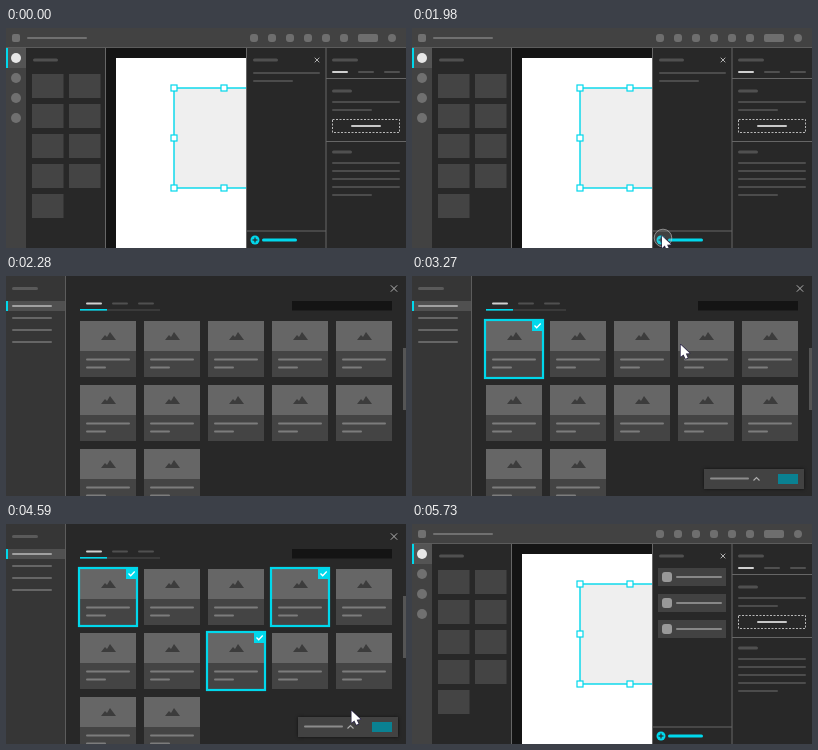
These frames come from a looping animation (400x220 px, 8100 ms). An HTML page with a canvas:

```html
<!DOCTYPE html>
<html lang="en">
<head>
<meta charset="utf-8">
<title>Adding items from a library</title>
<style>
html, body { margin: 0; width: 100%; height: 100%; overflow: hidden; background: #282828; }
canvas { display: block; width: 400px; height: 220px; }
</style>
</head>
<body>
<canvas id="stage"></canvas>
<script>
const W = 400, H = 220, LOOP = 8100, STEP = 30;
const CYAN = '#00d8ec', PANEL = '#282828', BAR = '#424242', EDGE = '#666', DIM = '#4c4c4c';
const scale = window.devicePixelRatio || 1;

function setup(canvas) {
  canvas.width = W * scale;
  canvas.height = H * scale;
  const ctx = canvas.getContext('2d');
  ctx.scale(scale, scale);
  return ctx;
}

const screen = setup(document.getElementById('stage'));
const layer = document.createElement('canvas');
const overlay = setup(layer);
let c = screen;

// Drawing helpers
function box(x, y, w, h, color, radius = 0) {
  c.fillStyle = color;
  c.beginPath();
  c.roundRect(x, y, w, h, radius);
  c.fill();
}
function frame(x, y, w, h, color, width) {
  c.strokeStyle = color;
  c.lineWidth = width;
  c.strokeRect(x, y, w, h);
}
function disc(x, y, r, color) {
  c.fillStyle = color;
  c.beginPath();
  c.arc(x, y, r, 0, Math.PI * 2);
  c.fill();
}
function bar(x1, x2, y, color, h = 2) {
  box(x1, y - h / 2, x2 - x1, h, color, h / 2);
}
function path(points, color, width) {
  c.strokeStyle = color;
  c.lineWidth = width;
  c.beginPath();
  points.forEach(([x, y]) => c.lineTo(x, y));
  c.stroke();
}
function cross(x, y, r) {
  path([[x - r, y - r], [x + r, y + r]], '#b0b0b0', 1);
  path([[x - r, y + r], [x + r, y - r]], '#b0b0b0', 1);
}

function drawTopBar() {
  box(0, 0, W, 20, BAR);
  box(0, 19, W, 1, '#5c5c5c');
  box(6, 6, 8, 8, '#707070', 2);
  bar(21, 81, 10, '#707070');
  for (let x = 248; x <= 338; x += 18) box(x - 4, 6, 8, 8, '#6e6e6e', 3);
  box(352, 6, 20, 8, '#6e6e6e', 2);
  disc(386, 10, 4, '#6e6e6e');
}

function drawLeftPanels() {
  box(0, 20, 20, 200, BAR);
  box(0, 20, 20, 20, '#545454');
  box(0, 20, 2, 20, CYAN);
  for (let i = 0; i < 4; i++) disc(10, 30 + i * 20, 5, i ? '#707070' : '#e8e8e8');
  box(20, 20, 80, 200, PANEL);
  bar(27, 52, 32, '#505050', 3);
  for (let i = 0; i < 9; i++) {
    box(26 + (i % 2) * 37, 46 + Math.floor(i / 2) * 30, 31.5, 24, '#444');
  }
  box(99, 20, 1, 200, EDGE);
}

function drawPage() {
  box(100, 20, 140, 200, '#141414');
  box(110, 30, 130, 190, '#fff');
  box(168, 60, 72, 100, '#efefef');
  frame(168, 60, 100, 100, CYAN, 1.4);
  for (const [x, y] of [[168, 60], [218, 60], [168, 110], [168, 160], [218, 160]]) {
    box(x - 3, y - 3, 6, 6, '#fff');
    frame(x - 3, y - 3, 6, 6, CYAN, 1.2);
  }
}

function drawItemPanel(filled) {
  box(240, 20, 80, 200, PANEL);
  bar(247, 272, 32, '#505050', 3);
  cross(311, 32, 2.3);
  if (filled) {
    for (const y of [44, 70, 96]) {
      box(246, y, 68, 18, BAR);
      box(250, y + 4, 10, 10, '#999', 3);
      bar(264, 310, y + 9, '#888');
    }
  } else {
    bar(247, 314, 45, DIM);
    bar(247, 287, 53, DIM);
  }
  box(240, 20, 1, 200, EDGE);
  box(240, 202.5, 80, 1, EDGE);
  disc(249, 212, 4.5, CYAN);
  path([[246.5, 212], [251.5, 212]], PANEL, 1.2);
  path([[249, 209.5], [249, 214.5]], PANEL, 1.2);
  bar(256, 291, 212, CYAN, 3);
}

function drawProperties() {
  box(320, 20, 80, 200, PANEL);
  box(319.5, 20, 1, 200, EDGE);
  bar(326, 352, 32, '#505050', 3);
  for (let i = 0; i < 3; i++) bar(326 + i * 26, 342 + i * 26, 44, i ? '#505050' : '#d0d0d0');
  box(320, 50, 80, 1, EDGE);
  bar(326, 346, 63, '#505050', 3);
  bar(326, 394, 74, DIM);
  bar(326, 366, 82, DIM);
  c.setLineDash([2, 1.5]);
  frame(326.5, 91.5, 67, 13, '#b8b8b8', 1);
  c.setLineDash([]);
  bar(345, 375, 98, '#c8c8c8');
  box(320, 113, 80, 1, EDGE);
  bar(326, 346, 124, '#505050', 3);
  for (let y = 135; y <= 167; y += 8) bar(326, y < 167 ? 394 : 366, y, DIM);
}

function drawEditor(filled) {
  drawLeftPanels();
  drawPage();
  drawItemPanel(filled);
  drawProperties();
  drawTopBar();
}

function drawCard(x, y, picked) {
  box(x, y, 56, 30, '#666');
  box(x, y + 30, 56, 26, '#444');
  c.fillStyle = '#3c3c3c';
  c.beginPath();
  for (const [px, py] of [[21, 19], [25, 14], [27, 16], [30, 11], [36, 19]]) c.lineTo(x + px, y + py);
  c.fill();
  bar(x + 6, x + 50, y + 38.5, '#7c7c7c');
  bar(x + 6, x + 26, y + 46.5, '#7c7c7c');
  if (!picked) return;
  frame(x - 1, y - 1, 58, 58, CYAN, 2.2);
  box(x + 46, y - 1, 11, 11, CYAN);
  path([[x + 48.5, y + 4.5], [x + 50.7, y + 6.8], [x + 54.7, y + 2.5]], '#fff', 1.3);
}

// Card index and the moment it gets picked
const picks = { 0: 2880, 3: 3480, 7: 4080 };

function drawLibrary(t) {
  box(0, 0, W, H, PANEL);
  box(0, 0, 60, H, '#363636');
  box(59, 0, 1, H, '#5c5c5c');
  bar(6, 32, 12.5, '#5a5a5a', 3);
  box(0, 25, 59, 10, '#505050');
  box(0, 25, 2, 10, CYAN);
  for (let i = 0; i < 4; i++) bar(6, 46, 30 + i * 12, i ? '#666' : '#a0a0a0');
  cross(388, 12.5, 3.2);
  for (let i = 0; i < 3; i++) bar(80 + i * 26, 96 + i * 26, 27.5, i ? '#505050' : '#d0d0d0');
  box(74, 33.5, 80, 1, '#4c4c4c');
  box(74, 33, 27, 1.6, CYAN);
  box(286, 25, 100, 9.5, '#141414');
  box(397, 72, 3, 62, '#555');
  for (let i = 0; i < 12; i++) {
    drawCard(74 + (i % 5) * 64, 45 + Math.floor(i / 5) * 64, t >= picks[i]);
  }
  if (t >= picks[0]) drawActionBar();
}

function drawActionBar() {
  c.save();
  c.shadowColor = 'rgba(0,0,0,.6)';
  c.shadowBlur = 3 * scale;
  box(292, 193, 100, 20, BAR);
  c.restore();
  bar(298, 337, 202.5, '#8c8c8c');
  path([[341.5, 204.5], [344.5, 201.5], [347.5, 204.5]], '#b0b0b0', 1.1);
  box(366, 198, 20, 10, '#0a8192');
}

// Cursor moves: start, end, from, to
const moves = [
  [870, 1380, [205, 183], [250, 208]],
  [2310, 2730, [166, 99], [106, 65]],
  [2880, 3330, [106, 65], [277, 69]],
  [3480, 3930, [277, 69], [229, 131]],
  [4245, 4730, [229, 131], [375, 201]]
];
const clamp = v => Math.min(1, Math.max(0, v));
const part = (t, a, b) => clamp((t - a) / (b - a));
const ease = p => p * p * (3 - 2 * p);

function cursorAt(t) {
  const [a, b, from, to] = moves.filter(m => t >= m[0]).pop() || moves[0];
  const p = ease(part(t, a, b));
  return from.map((v, i) => v + (to[i] - v) * p);
}

const arrow = [[0, 0], [0, 12], [2.8, 9.6], [4.8, 14], [7, 13], [5.1, 8.8], [9, 8.5]];

function drawCursor(t, appear, press) {
  const [x, y] = cursorAt(t);
  const r = 8.8 * ease(part(t, press, press + 600));
  c.save();
  c.globalAlpha = part(t, appear, appear + 150);
  if (r > 0) {
    disc(x + 1, y + 2, r, 'rgba(160,160,160,.2)');
    c.strokeStyle = 'rgba(200,200,200,.6)';
    c.lineWidth = 1;
    c.stroke();
  }
  c.translate(x, y);
  c.beginPath();
  arrow.forEach(([px, py]) => c.lineTo(px, py));
  c.closePath();
  c.fillStyle = '#fff';
  c.strokeStyle = '#2b2548';
  c.lineWidth = 1.4;
  c.lineJoin = 'round';
  c.stroke();
  c.fill();
  c.restore();
}

function render(t) {
  c = screen;
  drawEditor(t >= 5430);
  if (t >= 870 && t < 2280) drawCursor(t, 840, 1380);
  const shown = part(t, 1980, 2280) - part(t, 5430, 5730);
  if (shown <= 0) return;
  c = overlay;
  drawLibrary(t);
  if (t >= 2310) drawCursor(t, 2310, 4770);
  screen.globalAlpha = shown;
  screen.drawImage(layer, 0, 0, W, H);
  screen.globalAlpha = 1;
}

const start = performance.now();
function tick() {
  const t = (performance.now() - start) % LOOP;
  render(Math.floor(t / STEP) * STEP);
  requestAnimationFrame(tick);
}
tick();
</script>
</body>
</html>
```
